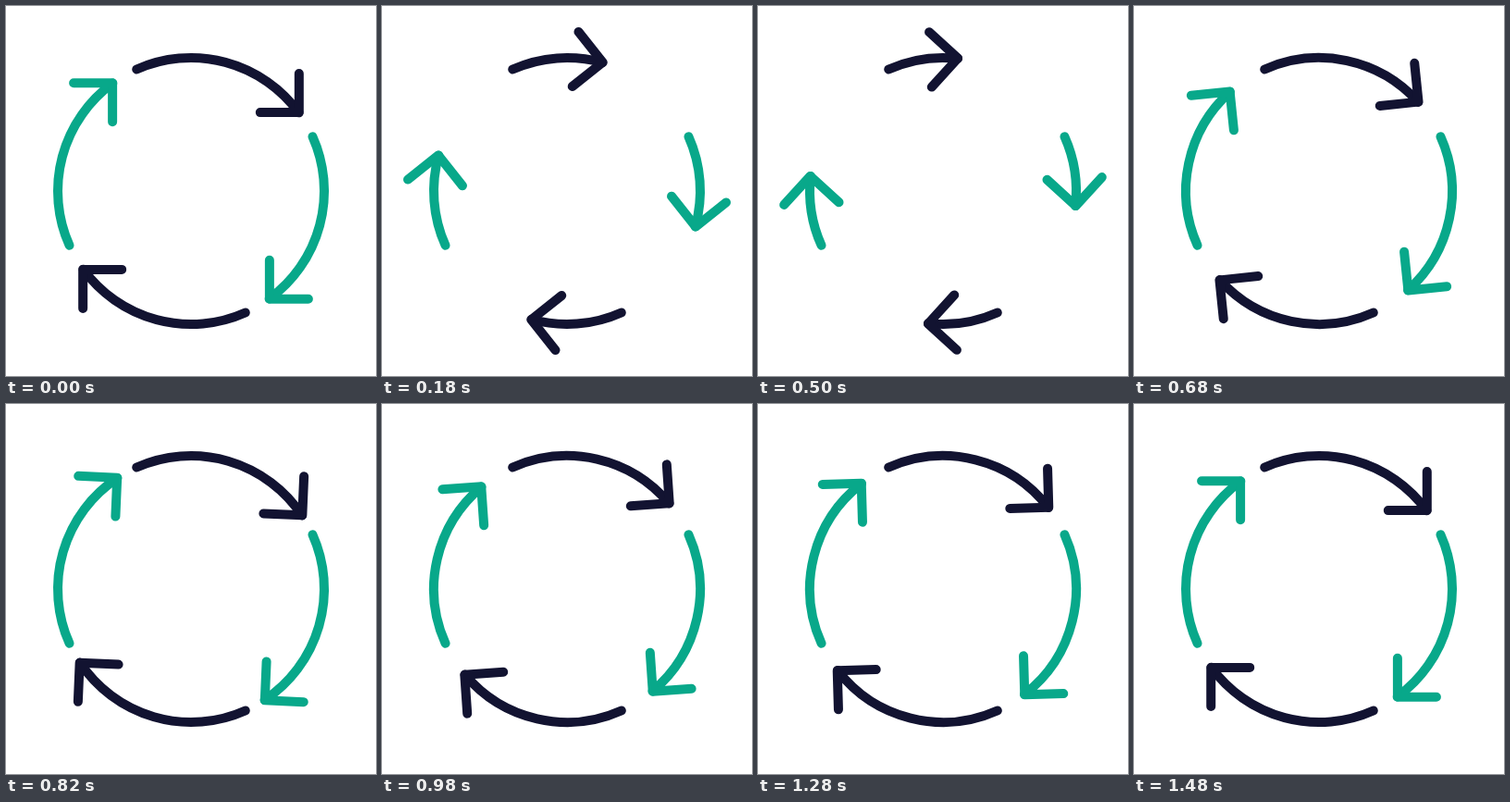
Animation, 400 px wide and 400 px high, one loop 1520 ms. Source, as an HTML page:

```html
<!DOCTYPE html>
<html lang="en">
<head>
<meta charset="utf-8">
<title>Cycle arrows</title>
<style>
  html, body { margin: 0; width: 100%; height: 100%; overflow: hidden; background: #fff; }
  svg { display: block; width: 100%; height: 100%; }
  path { fill: none; stroke-width: 10; stroke-linecap: round; stroke-linejoin: round; }
</style>
</head>
<body>
<svg viewBox="0 0 400 400"><g id="ring" transform="translate(200 200)"></g></svg>
<script>
const LOOP = 1520, STEP = 20, LAST = 1480;
const RADIUS = 144, TIP_RADIUS = 144.4, TAIL = -24.1, WING = 42, TILT = -9;
const COLORS = ['#121331', '#08a88a'];

// [time in ms, angle of the tip in degrees clockwise from the top]
const KEYS = [[0, 54], [250, 6.4], [500, 6.4], [750, 58], [1000, 49.9], [1500, 54]];

const NS = 'http://www.w3.org/2000/svg';
const ring = document.getElementById('ring');
const ease = p => p * p * (3 - 2 * p);

function add(parent, tag, attrs) {
  const el = document.createElementNS(NS, tag);
  for (const name in attrs) el.setAttribute(name, attrs[name]);
  return parent.appendChild(el);
}

const arrows = [0, 1, 2, 3].map(i => {
  const g = add(ring, 'g', { transform: `rotate(${i * 90})`, stroke: COLORS[i % 2] });
  return {
    shaft: add(g, 'path', {}),
    head: add(g, 'path', { d: `M${-WING} 0H0V${-WING}` })
  };
});

function onCircle(deg, r) {
  const a = deg * Math.PI / 180;
  return `${(r * Math.sin(a)).toFixed(3)} ${(-r * Math.cos(a)).toFixed(3)}`;
}

function tipAngle(t) {
  for (let i = 1; i < KEYS.length; i++) {
    const [t0, a0] = KEYS[i - 1], [t1, a1] = KEYS[i];
    if (t < t1) return a0 + (a1 - a0) * ease((t - t0) / (t1 - t0));
  }
  return KEYS[KEYS.length - 1][1];
}

function draw(ms) {
  const t = Math.min(LAST, Math.floor((ms % LOOP) / STEP + 1e-6) * STEP);
  const tip = tipAngle(t);
  const arc = `M${onCircle(TAIL, RADIUS)}A${RADIUS} ${RADIUS} 0 0 1 ${onCircle(tip, RADIUS)}`;
  // the head is drawn pointing 45 degrees down to the right
  const place = `translate(${onCircle(tip, TIP_RADIUS)}) rotate(${(tip + TILT - 45).toFixed(3)})`;
  for (const { shaft, head } of arrows) {
    shaft.setAttribute('d', arc);
    head.setAttribute('transform', place);
  }
}

const start = performance.now();
function tick() {
  draw(Math.max(0, performance.now() - start));
  requestAnimationFrame(tick);
}
tick();
</script>
</body>
</html>
```
